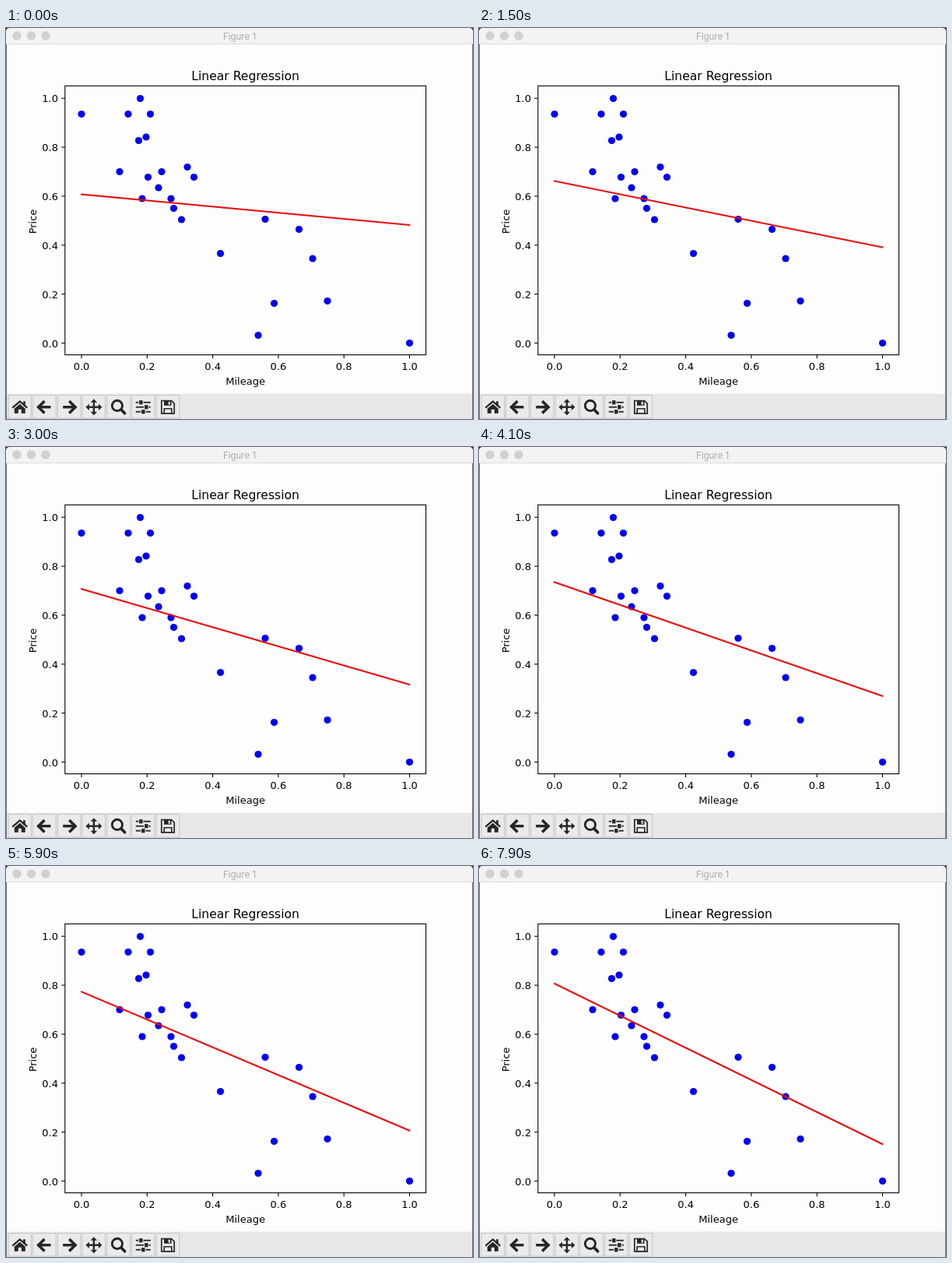
These frames come from a looping animation (600 by 502 pixels, 8000 ms). An HTML page with a canvas:

```html
<!DOCTYPE html>
<html lang="en">
<head>
<meta charset="utf-8">
<title>Linear Regression</title>
<style>
  html, body { margin: 0; width: 100%; height: 100%; overflow: hidden; background: #fefefe; }
  canvas { display: block; width: 600px; height: 502px; }
</style>
</head>
<body>
<canvas id="stage" width="600" height="502"></canvas>
<script>
const ctx = document.getElementById('stage').getContext('2d');
const LOOP = 8000, STEP = 100;
const PLOT_FONT = '"DejaVu Sans", sans-serif';
const INK = '#262626';

const points = [
  [97, 110.5], [157, 110.5], [172.5, 90.5], [185.5, 110.5], [180, 140], [170.5, 144.5],
  [146, 184.5], [182.5, 191.5], [200, 184.5], [233, 178.5], [241.5, 191.5], [196, 205],
  [175, 219], [212, 219], [215.5, 231.5], [225.5, 246], [275.5, 289.5], [333, 245.5],
  [376.5, 258.5], [394, 296], [413, 350.5], [344.5, 353.5], [324, 394.5], [518.5, 404.5]
];

function rect(x, y, w, h, color) {
  ctx.fillStyle = color;
  ctx.fillRect(x, y, w, h);
}

function disc(x, y, r, color) {
  ctx.fillStyle = color;
  ctx.beginPath();
  ctx.arc(x, y, r, 0, Math.PI * 2);
  ctx.fill();
}

function path(coords, color, width) {
  ctx.strokeStyle = color;
  ctx.lineWidth = width;
  ctx.beginPath();
  coords.forEach(([x, y], i) => i ? ctx.lineTo(x, y) : ctx.moveTo(x, y));
  ctx.stroke();
}

function poly(coords, color) {
  ctx.fillStyle = color;
  ctx.beginPath();
  coords.forEach(([x, y], i) => i ? ctx.lineTo(x, y) : ctx.moveTo(x, y));
  ctx.closePath();
  ctx.fill();
}

function label(text, x, y, size, align = 'center', color = '#000', font = PLOT_FONT) {
  ctx.font = size + 'px ' + font;
  ctx.textAlign = align;
  ctx.fillStyle = color;
  ctx.fillText(text, x, y);
}

function drawWindow() {
  rect(0, 0, 600, 502, '#fefdfe');
  rect(0, 0, 600, 20, '#f4f3f4');
  rect(0, 20, 600, 1, '#dcdbdc');
  for (const x of [14, 32.5, 51]) disc(x, 10, 5.8, '#d2d1d2');
  label('Figure 1', 300, 14.5, 11.5, 'center', '#aaa9aa', 'Inter, sans-serif');
}

function drawEdges() {
  rect(0, 21, 1, 481, '#66656a');
  rect(599, 21, 1, 481, '#66656a');
  poly([[0, 0], [4, 0], [1, 1], [0, 4]], '#111');
  poly([[600, 0], [596, 0], [599, 1], [600, 4]], '#111');
}

function drawAxes() {
  for (let i = 0; i <= 5; i++) {
    const x = 97 + i * 84.3, y = 404.5 - i * 62.85, text = (i / 5).toFixed(1);
    path([[x, 419.5], [x, 424.2]], '#000', 1.1);
    path([[76, y], [71.3, y]], '#000', 1.1);
    label(text, x, 439, 13);
    label(text, 67, y + 5, 13, 'right');
  }
  ctx.strokeStyle = '#000';
  ctx.lineWidth = 1.1;
  ctx.strokeRect(75.8, 74.3, 463.7, 345.3);
  label('Linear Regression', 307.6, 67, 15.6);
  label('Mileage', 307.6, 458, 13);
  ctx.save();
  ctx.translate(39, 248.5);
  ctx.rotate(-Math.PI / 2);
  label('Price', 0, 0, 13);
  ctx.restore();
}

function arrow(cx, cy, dir) {
  ctx.lineCap = 'butt';
  path([[cx + 9 * dir, cy], [cx - 8 * dir, cy]].reverse(), INK, 3.4);
  path([[cx, cy - 7.8], [cx + 7.8 * dir, cy], [cx, cy + 7.8]], INK, 3.6);
}

const icons = [
  function home(x, y) {
    path([[x - 9.5, y + 1], [x, y - 7.3], [x + 9.5, y + 1]], INK, 2.2);
    rect(x + 4.3, y - 7.5, 2.7, 6, INK);
    poly([[x, y - 4], [x + 7, y + 2], [x + 7, y + 8], [x + 2, y + 8], [x + 2, y + 3],
      [x - 2, y + 3], [x - 2, y + 8], [x - 7, y + 8], [x - 7, y + 2]], INK);
  },
  (x, y) => arrow(x, y, -1),
  (x, y) => arrow(x, y, 1),
  function move(x, y) {
    rect(x - 8, y - 1.2, 16, 2.4, INK);
    rect(x - 1.2, y - 8, 2.4, 16, INK);
    for (const d of [-1, 1]) {
      poly([[x, y + 10.5 * d], [x - 4.2, y + 6 * d], [x + 4.2, y + 6 * d]], INK);
      poly([[x + 10.5 * d, y], [x + 6 * d, y - 4.2], [x + 6 * d, y + 4.2]], INK);
    }
  },
  function zoom(x, y) {
    ctx.strokeStyle = INK;
    ctx.lineWidth = 2.9;
    ctx.beginPath();
    ctx.arc(x - 1.7, y - 1.8, 6.6, 0, Math.PI * 2);
    ctx.stroke();
    ctx.lineCap = 'round';
    path([[x + 3.8, y + 3.7], [x + 8, y + 8]], INK, 3.7);
    ctx.lineCap = 'butt';
  },
  function sliders(x, y) {
    [[-6, 3], [0, -4], [6, 1]].forEach(([dy, knob], i) => {
      const k = i === 1 ? 4 : i === 0 ? -3 : 0;
      rect(x - 9.5, y + dy - 0.9, 19, 1.8, INK);
      rect(x + k - 3.2, y + dy - 2.8, 6.4, 5.6, '#e9e8e9');
      rect(x + k - 2.2, y + dy - 2.6, 4.4, 5.2, INK);
    });
  },
  function save(x, y) {
    path([[x - 8.2, y - 8.2], [x + 4.6, y - 8.2], [x + 8.2, y - 4.6], [x + 8.2, y + 8.2],
      [x - 8.2, y + 8.2], [x - 8.2, y - 9]], INK, 1.7);
    rect(x - 5, y - 8, 9.5, 6, INK);
    rect(x + 0.6, y - 7, 2.2, 4, '#e9e8e9');
    path([[x - 4.8, y + 8], [x - 4.8, y + 2], [x + 4.8, y + 2], [x + 4.8, y + 8]], INK, 1.6);
  }
];

function drawToolbar() {
  rect(0, 469.5, 600, 32.5, '#e8e7e8');
  icons.forEach((icon, i) => {
    const x = 2.5 + i * 31.7;
    rect(x, 471.5, 30, 29.5, '#ebeaeb');
    ctx.strokeStyle = '#c6c5c6';
    ctx.lineWidth = 1;
    ctx.strokeRect(x + 0.5, 471.5, 29.5, 29.5);
    icon(x + 15.3, 486.7);
  });
}

// Gradient descent closes in on the best fit exponentially.
function drawFit(seconds) {
  const done = 1 - Math.exp(-0.1266 * seconds);
  ctx.lineCap = 'square';
  path([[97, 213.6 - 99 * done], [518.3, 253 + 164.6 * done]], '#e80c0c', 2);
  ctx.lineCap = 'butt';
}

function frame(now) {
  const t = Math.floor((now % LOOP) / STEP) * STEP;
  drawWindow();
  drawAxes();
  for (const [x, y] of points) disc(x, y, 4.6, '#0000f0');
  drawFit(t / 1000);
  drawToolbar();
  drawEdges();
}

const start = performance.now();
function tick() {
  frame(performance.now() - start);
  requestAnimationFrame(tick);
}
tick();
</script>
</body>
</html>
```
